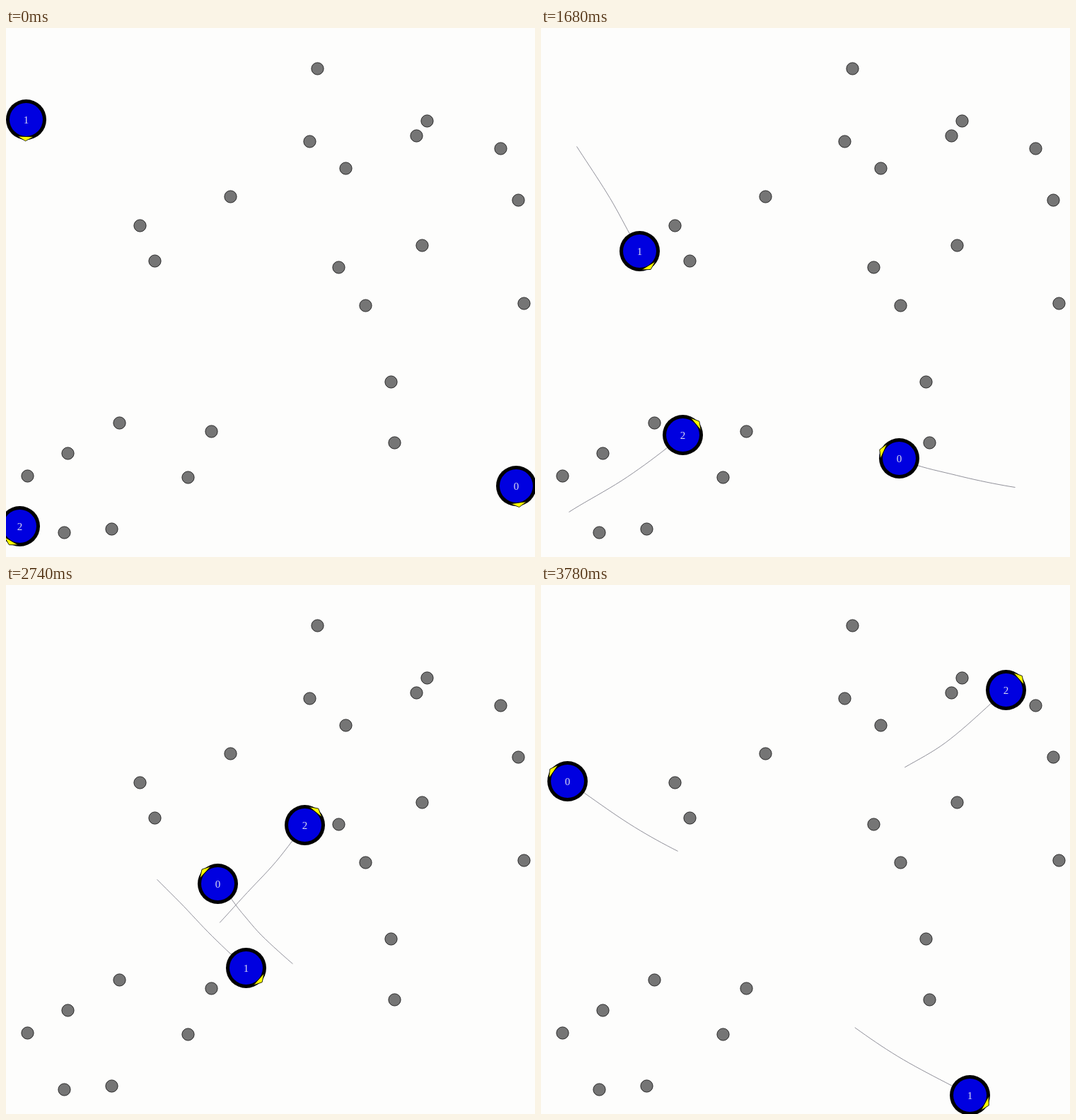
Recreate the animation shown at these times as an HTML page with a canvas. Size 748 px wide and 748 px high, loop 3.82 s.

```html
<!DOCTYPE html>
<html lang="en">
<head>
<meta charset="utf-8">
<title>Three robots crossing</title>
<style>
html, body { margin: 0; width: 100%; height: 100%; overflow: hidden; background: #fdfdfc; }
canvas { display: block; width: 748px; height: 748px; }
</style>
</head>
<body>
<canvas id="stage" width="748" height="748"></canvas>
<script>
const SIZE = 748, LOOP = 3820;
const WAIT = 880, STEP = 30.85, TRAIL = 20, REST = -1;
const ctx = document.getElementById('stage').getContext('2d');

const obstacles = [
  [440, 57], [595, 131], [580, 152], [429, 160], [699, 170], [480, 198], [724, 243], [317, 238],
  [189, 279], [210, 329], [588, 307], [470, 338], [508, 392], [732, 389], [544, 500], [549, 586],
  [160, 558], [290, 570], [87, 601], [30, 633], [257, 635], [82, 713], [149, 708]
];

// Steps at which every robot passes its key points
const keys = [REST, 0, 6, 16, 26, 36, 46, 53, 60, 66, 71, 82, 94];
const robots = [
  { rest: 82, path: [
    [721, 647], [703, 650], [670, 649], [587, 632], [506, 608], [433, 558], [366, 500],
    [333, 463], [299, 422], [256, 400], [216, 387], [132, 342], [37, 277]] },
  { rest: 92, path: [
    [28, 129], [33, 140], [50, 167], [97, 240], [139, 315], [189, 389], [251, 454],
    [291, 496], [339, 541], [384, 578], [421, 609], [504, 666], [606, 721]] },
  { rest: 120, path: [
    [19, 704], [20, 701], [39, 684], [122, 634], [200, 575], [274, 506], [341, 434],
    [381, 391], [422, 339], [457, 301], [492, 271], [572, 222], [657, 148]] }
];

// Cubic Hermite spline through the key points
function position({ path }, step) {
  const last = keys.length - 1;
  const s = Math.max(step, REST);
  let i = 0;
  while (i < last - 1 && keys[i + 1] <= s) i++;
  const span = keys[i + 1] - keys[i], u = (s - keys[i]) / span;
  const slope = (n, axis) => {
    const a = Math.max(n - 1, 0), b = Math.min(n + 1, last);
    return (path[b][axis] - path[a][axis]) / (keys[b] - keys[a]) * span;
  };
  return [0, 1].map(axis => {
    const p = path[i][axis], q = path[i + 1][axis];
    const m = slope(i, axis), n = slope(i + 1, axis);
    return p + u * (m + u * (3 * (q - p) - 2 * m - n + u * (2 * (p - q) + m + n)));
  });
}

function heading(robot, step) {
  if (step === REST) return robot.rest * Math.PI / 180;
  const [x0, y0] = position(robot, step - 1);
  const [x1, y1] = position(robot, step);
  return Math.atan2(y1 - y0, x1 - x0);
}

function disc(x, y, r, fill) {
  ctx.beginPath();
  ctx.arc(x, y, r, 0, Math.PI * 2);
  ctx.fillStyle = fill;
  ctx.fill();
}

function outline(color, width) {
  ctx.strokeStyle = color;
  ctx.lineWidth = width;
  ctx.stroke();
}

function drawTrail(robot, step) {
  ctx.beginPath();
  for (let s = step - TRAIL; s <= step; s++) ctx.lineTo(...position(robot, s));
  outline('#85858f', 0.9);
}

function drawRobot(robot, id, step) {
  ctx.save();
  ctx.translate(...position(robot, step));
  disc(0, 0, 28.5, '#000');

  ctx.save();
  ctx.rotate(heading(robot, step));
  ctx.beginPath();
  ctx.moveTo(30.3, 0);
  ctx.lineTo(24, 11.5);
  ctx.lineTo(24, -11.5);
  ctx.closePath();
  ctx.fillStyle = '#ff0';
  ctx.fill();
  outline('#000', 0.8);
  ctx.restore();

  disc(0, 0, 23.5, '#0000e0');
  ctx.fillStyle = '#d8d8f0';
  ctx.fillText(id, 0, 5);
  ctx.restore();
}

function draw(time) {
  const step = time < WAIT ? REST : Math.round((time - WAIT) / STEP);
  ctx.fillStyle = '#fdfdfc';
  ctx.fillRect(0, 0, SIZE, SIZE);
  ctx.font = '15px "Liberation Serif", serif';
  ctx.textAlign = 'center';

  ctx.save();
  ctx.translate(0.5, 0.5);
  for (const [x, y] of obstacles) {
    disc(x, y, 8.6, '#757575');
    outline('#222', 1);
  }
  robots.forEach(robot => drawTrail(robot, step));
  robots.forEach((robot, id) => drawRobot(robot, id, step));
  ctx.restore();
}

const start = performance.now();
function tick() {
  draw((performance.now() - start) % LOOP);
  requestAnimationFrame(tick);
}
tick();
</script>
</body>
</html>
```
